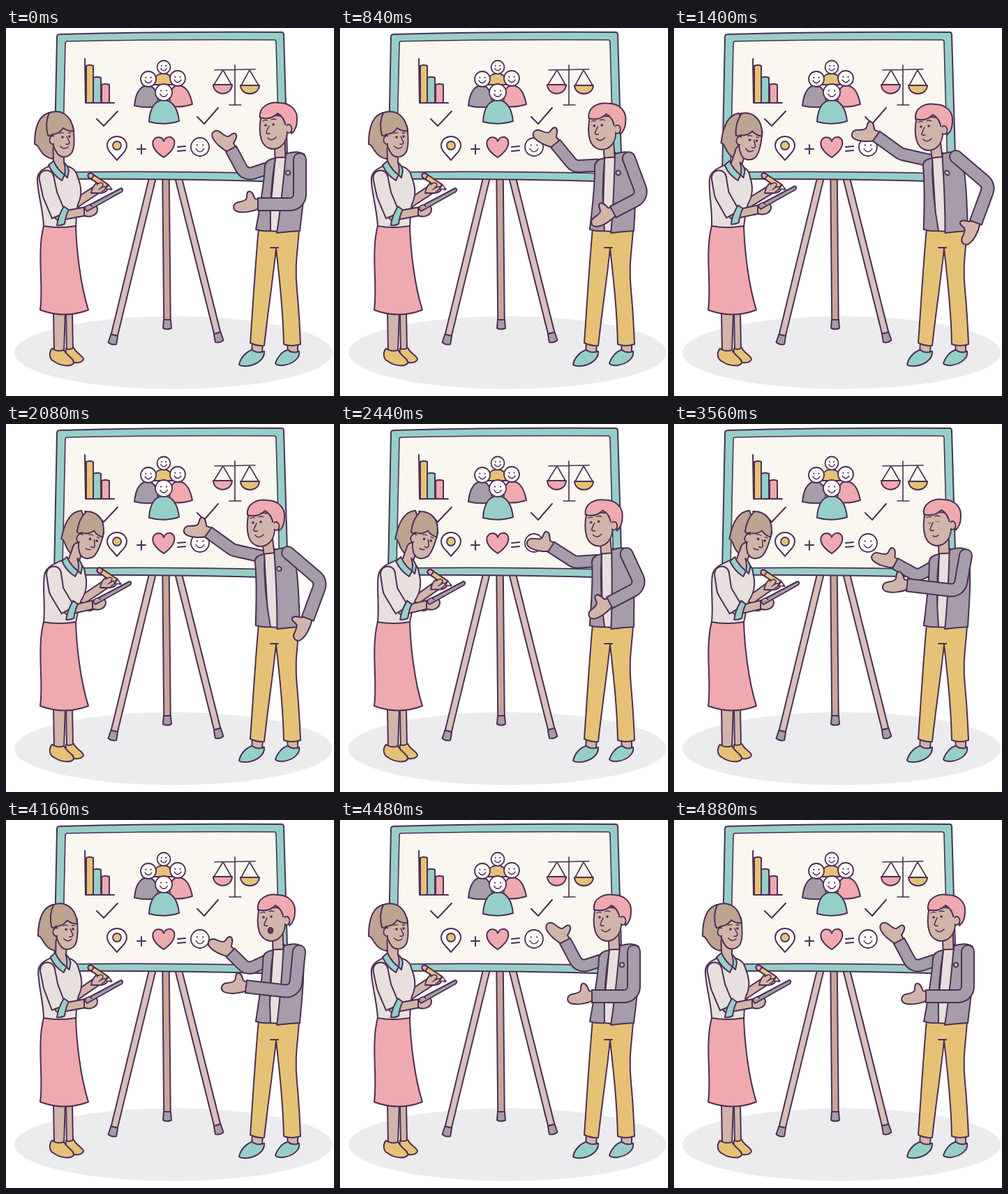
An HTML page with a canvas for the animation above (5 s loop, 470x526 px).

```html
<!DOCTYPE html>
<html lang="en">
<head>
<meta charset="utf-8">
<title>Whiteboard presentation</title>
<style>
  html, body { margin: 0; width: 470px; height: 526px; overflow: hidden; background: #fff; }
  canvas { display: block; }
</style>
</head>
<body>
<canvas id="stage" width="470" height="526"></canvas>
<script>
const ctx = document.getElementById('stage').getContext('2d');
const INK = '#4d2f54', TEAL = '#96cfc9', PINK = '#eeaaae', YELLOW = '#e6c277', GREY = '#a69caa',
      SKIN = '#d2b5a9', HAIR = '#bca491', SHIRT = '#e8e0de', CREAM = '#faf6f0', WOOD = '#d8bfb9';
const LOOP = 5000, STEP = 40, LAST = 4880;

// ---- drawing helpers
function shape(d, fill, line = INK, width = 2) {
  const path = new Path2D(d);
  if (fill) { ctx.fillStyle = fill; ctx.fill(path); }
  if (line) { ctx.strokeStyle = line; ctx.lineWidth = width; ctx.stroke(path); }
}

function oval(x, y, rx, ry, fill, line = INK) {
  ctx.beginPath();
  ctx.ellipse(x, y, rx, ry, 0, 0, 7);
  ctx.fillStyle = fill;
  ctx.fill();
  if (line) { ctx.strokeStyle = line; ctx.lineWidth = 1.8; ctx.stroke(); }
}
const dot = (x, y, r, fill = INK) => oval(x, y, r, r, fill, null);

// Rounded at the first point, bent softly, cut flat at the last one
function limb(points, width, color) {
  const [a, b] = points.slice(-2);
  const len = Math.hypot(b[0] - a[0], b[1] - a[1]) || 1;
  const inset = 2 / len;
  const end = [b[0] - (b[0] - a[0]) * inset, b[1] - (b[1] - a[1]) * inset];
  for (const [w, c, tip] of [[width + 2, INK, b], [width - 2, color, end]]) {
    ctx.beginPath();
    ctx.moveTo(...points[0]);
    if (points.length > 2) ctx.arcTo(...points[1], ...tip, 14);
    ctx.lineTo(...tip);
    ctx.lineCap = 'butt';
    ctx.lineWidth = w;
    ctx.strokeStyle = c;
    ctx.stroke();
    dot(...points[0], w / 2, c);
  }
  ctx.lineCap = 'round';
}

function place(x, y, degrees, draw, px = 0, py = 0) {
  ctx.save();
  ctx.translate(x, y);
  ctx.rotate(degrees * Math.PI / 180);
  ctx.translate(-px, -py);
  draw();
  ctx.restore();
}

// Shear everything above the waist sideways
function lean(k, waist, draw) {
  ctx.save();
  ctx.transform(1, 0, -k, 1, k * waist, 0);
  draw();
  ctx.restore();
}

// ---- motion: smooth curve through keyed poses, flat at holds and turns
function pose(keys, t) {
  let i = 0;
  while (i < keys.length - 2 && t >= keys[i + 1][0]) i++;
  const [t0, a] = keys[i], [t1, b] = keys[i + 1], span = t1 - t0;
  const u = Math.min(1, (t - t0) / span);
  const slope = (j, n) => {
    if (j < 1 || j > keys.length - 2) return 0;
    const [p, q, r] = [keys[j - 1], keys[j], keys[j + 1]];
    return (q[1][n] - p[1][n]) * (r[1][n] - q[1][n]) > 0
      ? (r[1][n] - p[1][n]) / (r[0] - p[0]) : 0;
  };
  return a.map((v, n) => {
    const h = u * u * (3 - 2 * u);
    return v + (b[n] - v) * h + span * u * (1 - u) * ((1 - u) * slope(i, n) - u * slope(i + 1, n));
  });
}

// head x, y | torso shift | arm: shoulder, elbow, wrist, hand angle (far, then near)
const OPEN  = [0, 0, 0,     373, 201, 343, 211, 322, 172, -131,  421, 188, 421, 252, 360, 252, 178];
const POINT = [-18, 2, -16, 365, 189, 325, 180, 289, 154, -171,  404, 184, 452, 225, 432, 279, 125];
const OFFER = [-6, 1, -6,   374, 203, 349, 217, 316, 199, -156,  418, 188, 409, 239, 333, 230, 180];
const LIFT  = [-3, 0, -3,   374, 201, 346, 214, 321, 189, -147,  420, 188, 414, 246, 343, 238, 182];
const manKeys = [[0, OPEN], [580, OPEN], [1160, POINT], [2200, POINT], [2700, OFFER],
                 [3900, OFFER], [4160, LIFT], [4400, OPEN], [LOOP, OPEN]];

// ear x, y | head angle | torso lean | clipboard x, y
const UPRIGHT = [67, 160, 0, 0, 0, 0];
const BOWED = [106, 163, 21, .15, 12, -4];
const womanKeys = [[0, UPRIGHT], [960, UPRIGHT], [1400, [94, 161, 12, .09, 8, -3]], [1760, BOWED],
                   [3760, BOWED], [4160, [72, 160, 2, .02, 0, 0]], [4360, UPRIGHT], [LOOP, UPRIGHT]];

const HIGH = [13, -2], LOW = [3, 3], REST = [0, 0];
const pencilKeys = [[0, REST], [960, REST], [1400, [8, 0]], [1600, LOW], [1840, LOW], [2080, HIGH],
                    [2320, LOW], [2560, HIGH], [2800, LOW], [3040, HIGH], [3300, LOW], [3560, [7, 1]],
                    [3760, HIGH], [4160, REST], [LOOP, REST]];

// ---- scene
function smiley(x, y, r) {
  oval(x, y, r, r, '#fffdfa');
  dot(x - r * .33, y - r * .2, 1.1);
  dot(x + r * .33, y - r * .2, 1.1);
  const w = r * .45;
  shape(`M${x - w} ${y + r * .2} Q${x} ${y + r * .85} ${x + w} ${y + r * .2}`, null, INK, 1.4);
}

function leg(x0, x1, y1, angle, color) {
  limb([[x0, 210], [x1, y1]], 9.5, color);
  place(x1, y1, angle, () => shape('M-5 -1 L5 -1 L6 11 Q0 14 -6 11 Z', GREY));
}

function board() {
  oval(240, 464, 228, 52, '#ecebee', null);
  leg(229, 231, 418, 0, '#c9a69b');
  leg(211, 155, 440, 14, WOOD);
  leg(246, 303, 437, -14, WOOD);
  shape('M77 9 Q230 5 395 6 Q398 6 398 10 L404 216 Q404 220 400 220 Q230 215 73 216 Q69 216 69 212 L73 13 Q73 9 77 9 Z', TEAL);
  shape('M88 19 Q230 16 384 17 Q387 17 387 20 L392 205 Q392 208 388 208 Q230 204 84 206 Q81 206 81 203 L85 22 Q85 19 88 19 Z', CREAM, INK, 1.6);

  shape('M115 107 V54 Q120 52 125 54 V107 Z', YELLOW);
  shape('M125 107 V71 Q131 69 136 71 V107 Z', TEAL);
  shape('M137 107 V81 Q143 79 148 81 V107 Z', PINK);
  shape('M113 44 L114 107 H155');

  shape('M211 81 C212 68 218 65 226 65 C234 65 238 70 239 81 Z', YELLOW);
  smiley(226, 56, 9.5);
  shape('M184 111 C186 91 193 82 204 82 C215 84 218 96 218 112 Q200 115 184 111 Z', GREY);
  shape('M235 112 C233 92 238 82 247 82 C259 83 264 94 267 109 Q252 114 235 112 Z', PINK);
  smiley(204, 73, 11);
  smiley(246, 72, 11);
  shape('M205 134 C206 112 215 103 226 103 C238 103 246 114 248 133 Q227 140 205 134 Z', TEAL);
  smiley(226, 92, 12);

  shape('M297 81 H324 C323 98 298 98 297 81 Z', PINK);
  shape('M336 82 H363 C362 98 337 98 336 82 Z', YELLOW);
  shape('M328 53 V110 M320 110 H337 M299 60 L357 59 M311 60 L298 81 M311 60 L323 81 M349 60 L337 82 M349 60 L362 82', null, INK, 1.6);

  shape('M130 130 L140 140 L160 119 M274 127 L284 137 L304 114');
  shape('M159 189 C153 181 145 176 145 168 A14 13 0 0 1 173 168 C173 176 165 181 159 189 Z', '#fffdfa');
  oval(159, 168, 6, 6, YELLOW);
  shape('M188 173 H200 M194 167 V180 M246 170 L257 169 M246 176 L257 175');
  shape('M226 185 C215 178 208 169 211 161 C215 154 224 155 226 162 C229 154 238 154 241 161 C243 170 236 178 226 185 Z', PINK);
  smiley(278, 170, 13);
}

const hand = (x, y, angle) => place(x, y, angle, () =>
  shape('M-5 -5 C8 -11 22 -12 30 -9 C37 -5 34 3 27 4 C20 5 16 6 15 9 C14 14 15 18 11 19 C6 19 5 13 3 8 L-5 6 Z', SKIN));

function manLegs() {
  shape('M353 448 L352 464 H367 L368 450 Z M403 450 L404 465 H418 L418 450 Z', SKIN);
  shape('M334 481 C336 472 343 463 353 460 Q360 466 370 462 C371 472 361 481 347 483 Q336 484 334 481 Z', TEAL);
  shape('M386 479 C389 470 396 462 404 460 Q411 466 420 462 C422 471 412 480 398 482 Q388 483 386 479 Z', TEAL);
  shape('M362 286 L420 286 C419 315 413 335 417 375 C420 405 421 430 422 452 Q410 456 398 452 C397 405 392 360 387 315 C383 355 376 400 370 454 Q360 455 350 450 C354 395 357 340 362 286 Z', YELLOW);
  shape('M379 314 H390', null);
}

function manHead(talking, open, blink) {
  shape('M366 124 C363 138 363 151 366 160 C370 171 381 176 391 171 C400 166 403 156 403 148 L402 126 Z', SKIN);
  shape('M364 128 C362 112 378 105 392 107 C408 107 418 118 417 131 C417 142 413 148 409 151 C409 142 405 138 401 142 C400 134 397 126 389 122 C383 128 374 131 364 128 Z', PINK);
  oval(405, 144, 4.5, 6, SKIN);
  ctx.fillStyle = SKIN;
  ctx.fillRect(397, 139, 5, 10);
  shape('M368 133 Q370 131 374 132 M380 131 Q383 129 387 131', null, INK, 1.3);
  if (blink) shape('M370 140 Q372 142 375 140 M381 138 Q384 140 387 138', null, '#8c6f77', 1.3);
  else { dot(372, 139, 1.8); dot(383, 138, 1.8); }
  shape('M377 140 Q373 148 373 150 Q375 152 378 151', null, INK, 1.6);
  if (open) oval(382, 158, 3.4, 4, '#6d3b4c');
  else shape(talking ? 'M377 159 Q381 161 385 158' : 'M375 157 Q381 163 387 156', null, INK, 1.6);
}

function man(t) {
  const p = pose(manKeys, t);
  const wave = t < 560 ? Math.sin(t * Math.PI / 280)
             : t > 2800 && t < 3560 ? Math.sin((t - 2800) * Math.PI / 190) : 0;
  const [hx, hy, shift, sx, sy, ex, ey, wx, wy, angle, sx2, sy2, ex2, ey2, wx2, wy2, angle2] = p;
  const talking = t > 2440 && t < 4280;
  const open = talking && (t - 2800 + LOOP * 2) % 400 < 200;
  const far = [wx - wave * 2, wy - wave * 2], near = [wx2 - wave * 2, wy2 + wave * 2];

  manLegs();
  hand(...far, angle);
  limb([[sx, sy], [ex, ey], far], 17, GREY);
  lean(shift / 105, 290, () => {
    shape('M386 184 L402 178 L398 250 L392 291 L376 290 Z', SHIRT);
    shape('M386 186 C379 187 372 190 371 197 C370 224 364 255 358 288 Q368 291 379 290 C378 255 381 215 386 186 Z', GREY);
    shape('M401 180 Q418 174 428 181 C431 215 425 255 421 290 Q404 291 388 293 C394 255 398 215 401 180 Z', GREY);
    if (t < 2300 || t > 4280) oval(404, 207, 3.2, 3.2, TEAL);
  });
  limb([[392 + hx, 158 + hy], [393 + shift, 186]], 15, SKIN);
  place(hx, hy, 0, () => manHead(talking, open, t >= 3520 && t < 3640));
  hand(...near, angle2);
  limb([[sx2, sy2], [ex2, ey2], near], 18, GREY);
}

function womanLegs() {
  shape('M86 405 L87 462 H96 L95 405 Z', SKIN);
  shape('M86 458 C85 466 87 474 94 477 Q106 481 111 474 C111 468 102 467 97 457 Q91 461 86 458 Z', YELLOW);
  shape('M68 405 L69 463 H83 L85 405 Z', SKIN);
  shape('M66 458 C61 464 62 473 68 476 C78 483 92 485 97 479 C98 472 88 470 83 460 Q74 464 66 458 Z', YELLOW);
}

const backHair = () =>
  shape('M62 121 C46 125 41 145 41 166 C46 167 47 172 50 176 Q56 185 66 187 L74 180 L72 140 Z', HAIR);

function womanHead(bowed) {
  shape('M66 150 C66 165 68 172 74 180 C80 187 90 185 95 177 C99 168 98 155 96 140 L70 138 Z', SKIN);
  shape('M60 122 C75 115 93 121 97 147 C91 148 86 146 82 143 C78 149 72 152 66 152 Q63 156 60 153 C57 142 58 130 62 121 Z', HAIR);
  oval(67, 160, 4.5, 6, SKIN);
  ctx.fillStyle = SKIN;
  ctx.fillRect(69, 154, 5, 12);
  shape('M77 151 Q80 149 83 150 M89 150 L93 150', null, INK, 1.3);
  dot(81, 156, 1.8);
  dot(91, 155, 1.8);
  shape('M87 155 Q91 163 91 164 Q90 167 86 166', null, INK, 1.6);
  shape(bowed ? 'M80 171 Q84 172 87 170' : 'M78 169 Q83 175 89 170', null, INK, 1.6);
}

function pencil() {
  limb([[121, 211], [145, 227]], 7, YELLOW);
  limb([[121, 211], [125, 213.7]], 7, PINK);
  shape('M147 224 L152 231 L143 230 Z', SHIRT, INK, 1.3);
  dot(150.5, 230, 1.6);
}

function woman(t) {
  const [earX, earY, tilt, k, dx, dy] = pose(womanKeys, t);
  const [px, py] = pose(pencilKeys, t);
  const wrist = [130 + px, 231 + py], chest = k * 70;

  womanLegs();
  limb([[101 + chest, 250], wrist], 12, SKIN);
  oval(104 + dx * 1.3, 262, 7, 5, TEAL);
  lean(k, 283, () => {
    shape('M54 285 C54 262 44 232 45 214 C47 202 60 199 70 193 L86 197 C98 200 101 206 103 214 C108 226 109 240 103 252 C100 265 101 275 100 285 Z', SHIRT);
  });
  shape('M54 283 Q76 287 100 283 C101 315 106 365 118 403 Q84 416 49 403 C54 370 44 320 54 283 Z', PINK);

  // neck and collar follow the head further than the shoulders do
  const collar = k * 128;
  place(earX, earY, tilt / 2, backHair, 67, 160);
  limb([[earX + 8 - tilt * .5, earY + 14], [76 + collar, 200]], 15, SKIN);
  place(collar, 0, 0, () => {
    shape('M69 193 L84 194 L84 210 Z', SKIN, null);
    shape('M61 196 L68 190 Q74 203 84 210 L80 218 Q67 210 61 196 Z', TEAL);
    shape('M84 210 Q86 202 83 192 Q89 197 90 204 L88 214 Z', TEAL);
  });
  place(earX, earY, tilt, () => womanHead(t > 1640 && t < 4000), 67, 160);

  // writing hand
  place(px, py, 0, () => {
    shape('M122 236 C123 228 128 222 133 219 L145 227 C147 232 141 236 136 236 Z', SKIN);
    pencil();
    shape('M130 224 Q136 219 139 223 Q139 227 133 231 M136 229 Q141 225 143 228 Q142 232 137 234', SKIN, INK, 1.5);
  });

  // holding arm and clipboard
  const elbow = [76 + dx * 1.1, 269 + dy * .6];
  limb([elbow, [114 + dx, 262 + dy]], 12, SKIN);
  place(dx, dy, 0, () => {
    shape('M112 257 C120 251 129 251 131 258 C132 267 121 272 112 268 Z', SKIN);
    shape('M112 257 L165 229 Q169 230 166 234 L116 262 Z', GREY);
    shape('M113 257 Q118 250 123 255', SKIN, INK, 1.5);
  });
  limb([[58 + k * 70, 214], [63 + k * 60, 238], elbow], 21, SHIRT);
  place(...elbow, 0, () => shape('M-3 13 C-2 4 2 -6 7 -14 L14 -9 C10 -3 9 4 8 11 Q2 14 -3 13 Z', TEAL));
}

function frame(now) {
  const t = Math.min(LAST, Math.floor(now % LOOP / STEP) * STEP);
  ctx.fillStyle = '#fff';
  ctx.fillRect(0, 0, 470, 526);
  ctx.lineCap = ctx.lineJoin = 'round';
  board();
  man(t);
  woman(t);
  requestAnimationFrame(frame);
}
requestAnimationFrame(frame);
</script>
</body>
</html>
```
